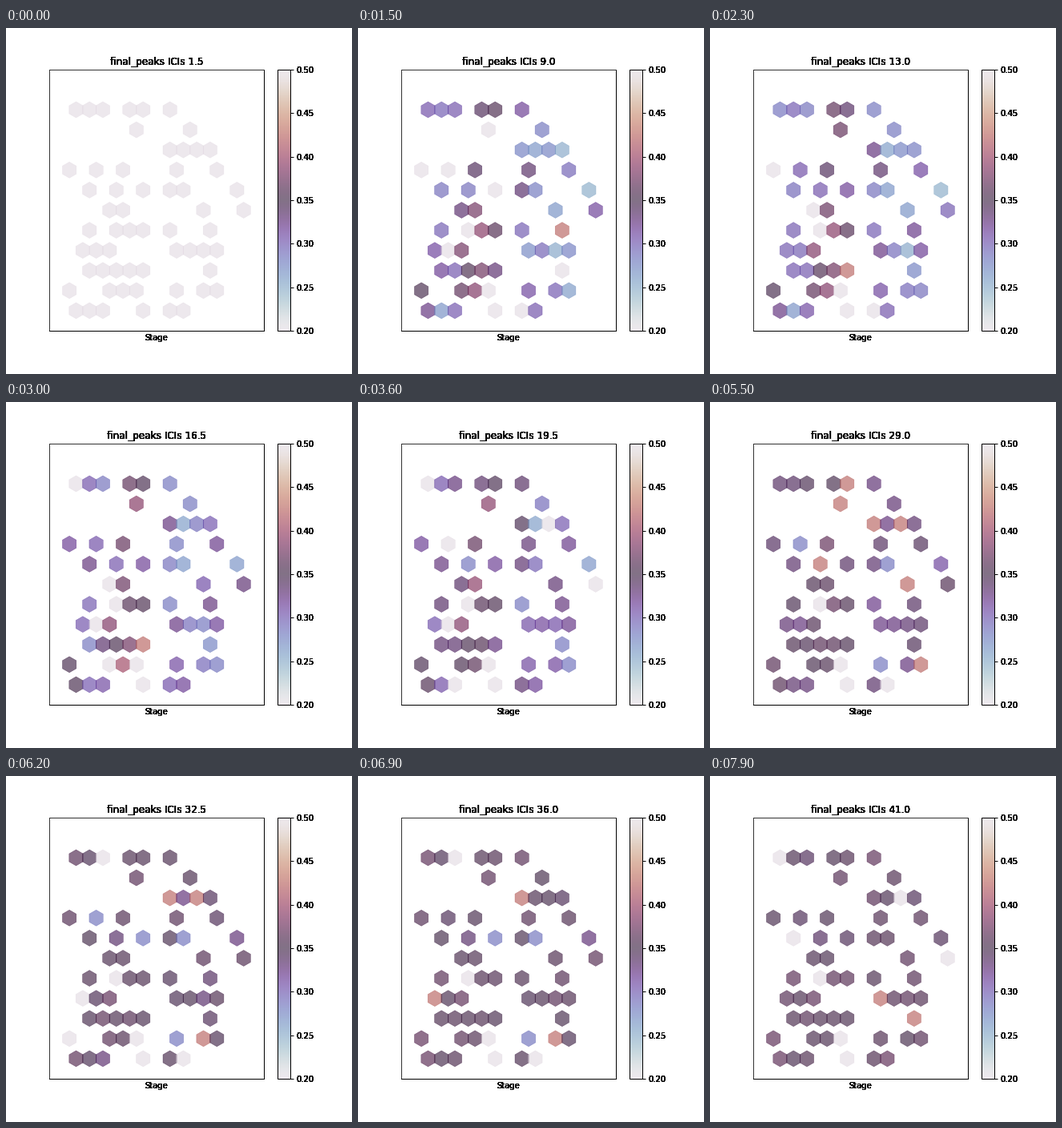
A matplotlib script that plays this animation: 432x432 px, repeating every 8000 ms.

```python
import math
import random

import matplotlib.pyplot as plt
import numpy as np
from matplotlib.animation import FuncAnimation

SIZE = 432
FRAMES, STEP = 80, 100
BLANK, REST = 0.20, 0.355

# Occupied columns per row; even rows are shifted by half a column.
LAYOUT = {
    11: [2, 3, 4, 6, 7, 9],
    10: [6, 10],
    9: [9, 10, 11, 12],
    8: [1, 3, 5, 9, 12],
    7: [3, 5, 7, 9, 10, 14],
    6: [4, 5, 11, 14],
    5: [3, 5, 6, 7, 9, 12],
    4: [2, 3, 4, 9, 10, 11, 12],
    3: [3, 4, 5, 6, 7, 12],
    2: [1, 4, 5, 6, 9, 11, 12],
    1: [2, 3, 4, 7, 9, 10],
}
FAINT = {(5, 5), (6.5, 2), (7, 1)}

plt.rcParams.update({"font.family": "DejaVu Sans", "axes.linewidth": 1.0})
rng = random.Random(7)


def level(x, i, bias):
    """Blue at the sides and dark in the centre, settling to the rest level."""
    settled = min(max((i - 15) / 45, 0), 1)
    early = 0.285 + 0.085 * math.exp(-((x - 5.7) / 2) ** 2)
    spread = 1 - 0.75 * settled
    pick = rng.random()
    if pick < 0.06:
        return BLANK
    if pick > 0.95:
        return REST + rng.choice([-0.07, 0.07])
    mean = early + (REST - early) * settled
    return min(max(mean + spread * (bias + rng.gauss(0, 0.015)), 0.25), 0.48)


def series(x, y):
    """Level of one cell over the loop: held, then changed in hard steps."""
    out = np.full(FRAMES, BLANK)
    if (x, y) in FAINT:
        return out
    central = 4.5 <= x <= 7 and y >= 4
    i = rng.randint(3, 9) if central else rng.randint(10, 15)
    bias = rng.gauss(0, 0.025)
    while i < FRAMES:
        hold = rng.randint(5, 16)
        out[i:i + hold] = level(x, i, bias)
        i += hold
    return out


cells = [(col + 0.5 * (y % 2 == 0), y) for y, cols in LAYOUT.items() for col in cols]
xs, ys = zip(*cells)
values = np.array([series(x, y) for x, y in cells])

fig, ax = plt.subplots(figsize=(SIZE / 72, SIZE / 72), dpi=72)
fig.subplots_adjust(left=0.125, right=0.9, bottom=0.125, top=0.88)
hexes = ax.scatter(xs, ys, c=values[:, 0], s=400, marker="h", cmap="twilight",
                   vmin=0.2, vmax=0.5, alpha=0.6, linewidths=0.5)
bar = fig.colorbar(hexes, ax=ax)
bar.set_ticks(np.arange(0.2, 0.51, 0.05))
bar.ax.tick_params(labelright=False, width=1, length=4)
ax.set(xlim=(0, 16), ylim=(0, 13), xticks=[], yticks=[])
ax.spines[["left", "top"]].set_color("0.2")


def ink(x, y, text, **style):
    """Overprint text so its soft edges turn dark."""
    return [fig.text(x / SIZE, y / SIZE, text, **style) for _ in range(12)]


left, bottom = 54, 54
width, height = 0.62 * SIZE, 0.755 * SIZE
middle = left + width / 2
title = ink(middle, bottom + height + 6, "", size=12, ha="center", va="baseline")
ink(middle, bottom - 4, "Stage", size=10, ha="center", va="top")
for i in range(7):
    ink(361.9, bottom + height * i / 6, f"{0.2 + 0.05 * i:.2f}",
        size=10, ha="left", va="center_baseline")


def update(i):
    hexes.set_array(values[:, i])
    for t in title:
        t.set_text(f"final_peaks ICIs {1.5 + 0.5 * i:.1f}")
    return [hexes, *title]


anim = FuncAnimation(fig, update, frames=FRAMES, interval=STEP, repeat=True,
                     repeat_delay=0, blit=False)
plt.show()
```
